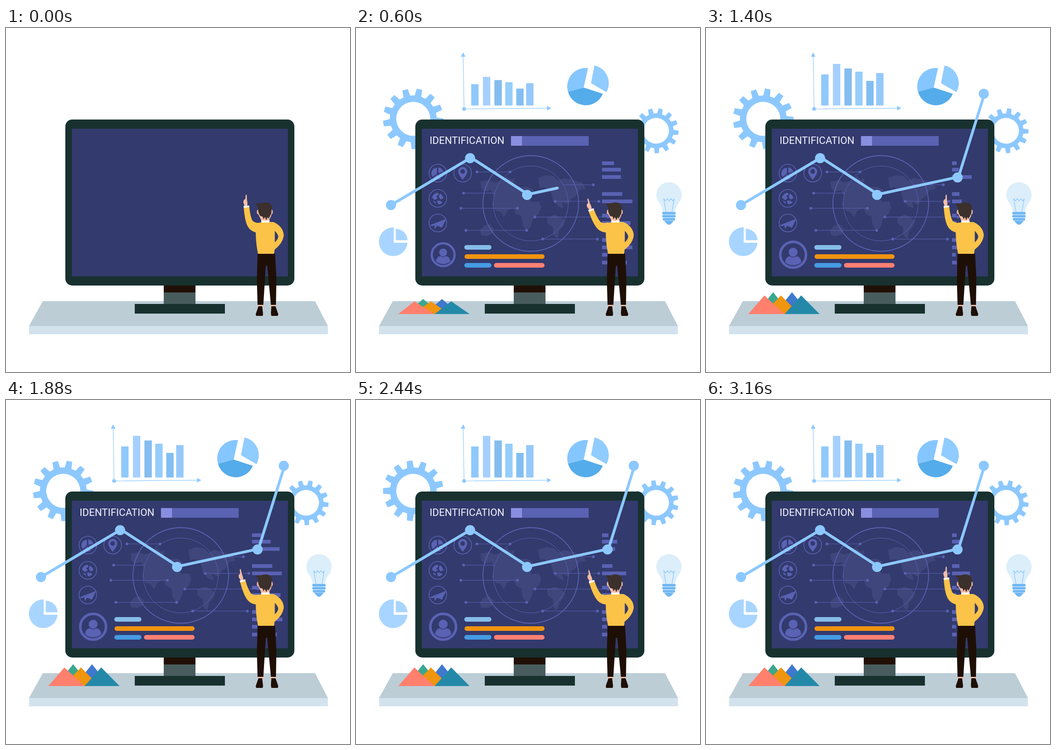
Recreate the animation shown at these times as an HTML page. Size 748x748 px, loop 3200 ms.

```html
<!DOCTYPE html>
<html lang="en">
<head>
<meta charset="utf-8">
<title>Identification dashboard</title>
<style>
html, body { margin: 0; width: 100%; height: 100%; overflow: hidden; background: #fff; }
svg { display: block; width: 100vw; height: 100vh; }
text { font: 22px Roboto, "Liberation Sans", sans-serif; fill: #f3f4ff; }
.ink { fill: #5a62b4; }
.wire { fill: none; stroke: #5a62b4; }
.sky { fill: #8cc8ff; }
.skin { fill: #f4bda6; }
.dark { fill: #18312f; }
.black { fill: #1e0f06; }
.shirt { fill: #fbc348; }
</style>
</head>
<body>
<svg viewBox="0 0 748 748">
  <g id="gears" class="sky" fill-rule="evenodd"></g>

  <g id="axes" class="sky">
    <path d="M233 60L235 176L418 174.300" fill="none" stroke="#8cc8ff" stroke-width="1.200"/>
    <path d="M233 53L238 62.500H228ZM424.500 174.300L415.500 169.500V179.500Z"/>
    <circle cx="235" cy="176" r="4"/>
  </g>
  <g id="columns"></g>

  <g class="pop" data-x="505" data-y="125">
    <path d="M495 129.500L504.500 87.300A40 40 0 0 0 461 138.500Z" fill="#85c6ff"/>
    <path d="M495 129.500L461 138.500A40 40 0 0 0 536.700 143Z" fill="#55acea"/>
    <path d="M511 120L518.500 81.500A39.300 39.300 0 0 1 544.500 139.500Z" fill="#90ccff"/>
  </g>
  <g class="pop" data-x="81" data-y="465" fill="#a8d5ff">
    <path d="M82 433.500V467H112A31.200 31.200 0 1 1 82 433.500Z"/>
    <path d="M86.500 436.500A25.500 25.500 0 0 1 112 461.500H86.500Z"/>
  </g>
  <g class="pop" data-x="680.5" data-y="380" fill="#70b7f4">
    <path d="M667 400Q666 389 659 380A27.500 27.500 0 1 1 702 380Q695 389 694 400Z" fill="#dbeefa"/>
    <path d="M674 400L669 371L673 376L677 371L681 376L685 371L689 376L692 371L687 400" fill="none" stroke="#8cc8ff" stroke-width="1.300"/>
    <rect x="666" y="400" width="29" height="5.500" rx="2"/>
    <rect x="666" y="406.500" width="29" height="5.500" rx="2"/>
    <rect x="667" y="413" width="27" height="5.500" rx="2"/>
    <path d="M670 419H691L686 425Q680.500 431 675 425Z"/>
  </g>

  <path d="M80 594H672L700 648H50Z" fill="#bccdd6"/>
  <rect x="50" y="648" width="650" height="18" fill="#d3e3ee"/>
  <rect class="dark" x="129" y="199" width="498" height="361" rx="15"/>
  <rect x="143" y="219" width="470" height="321" fill="#333a6d"/>
  <rect x="343" y="560" width="69" height="15" fill="#200f04"/>
  <rect x="343" y="575" width="69" height="26" fill="#485c5e"/>
  <rect class="dark" x="280" y="600" width="196" height="21"/>

  <g id="screen">
    <text x="160" y="252">IDENTIFICATION</text>
    <rect class="ink" x="337" y="235" width="169" height="21"/>
    <rect x="337" y="235" width="24" height="21" fill="#8a8ee0"/>

    <g fill="#3f467b">
      <path d="M271 334L290 331L300 336L318 332L328 322L336 330L345 326L342 340L356 346L372 345L385 352L384 364L376 368L382 378L398 377L403 390L396 406L386 412L380 432L371 442L362 428L360 410L348 404L343 392L330 396L322 412L314 400L304 398L296 384L300 366L294 352L280 356L272 348Z"/>
      <path d="M396 326L412 320L430 322L440 332L452 326L470 330L492 337L500 350L486 352L478 366L468 372L462 384L448 378L452 392L440 388L428 374L424 356L410 346L400 348Z"/>
      <path d="M416 412L432 406L446 412L455 420L450 432L442 440L438 458L430 452L428 434L416 424Z"/>
      <path d="M270 440L278 430L290 427L300 436L296 448L284 452L272 451Z"/>
    </g>
    <circle class="wire" cx="380" cy="381.500" r="104" stroke-width="1.800"/>
    <circle class="wire" cx="380" cy="381.500" r="81.500"/>
    <g id="leads" class="ink"></g>

    <g class="wire" stroke-width="1.600">
      <circle cx="178" cy="315.500" r="19.200"/>
      <circle cx="232" cy="315.500" r="19.200"/>
      <circle cx="178" cy="370.500" r="19.200"/>
      <circle cx="178" cy="424" r="19.200"/>
    </g>
    <g class="ink">
      <path d="M176 316V304A12 12 0 0 0 167 324ZM177 318L168 326A13 13 0 0 0 185 327ZM179 315V303A13 13 0 0 1 190 313ZM180 317L190 316Q190 322 187 325Z"/>
      <path fill-rule="evenodd" d="M232 330Q222 318 222 312A10 10 0 0 1 242 312Q242 318 232 330ZM232 307A5 5 0 1 0 232 317A5 5 0 1 0 232 307Z"/>
      <path d="M166 366Q170 359 177 358L180 362L174 366L178 370L172 374L166 370ZM182 360Q189 363 190 370L184 373L180 367ZM176 375L184 376L188 379Q184 384 178 383ZM167 375L173 378L174 382Q169 380 167 375Z"/>
      <path d="M160 429L196 415L187 434L176 430L172 437L170 429L190 418L166 431Z"/>
    </g>
    <g id="avatar">
      <circle class="wire" cx="189.500" cy="493" r="28" stroke-width="5.500"/>
      <path class="ink" d="M172 509Q173 497 184 496H195Q206 497 207 509Q200 516 189.500 516Q179 516 172 509Z"/>
      <circle cx="189.500" cy="487.500" r="10.500" class="ink" stroke="#333a6d" stroke-width="1.500"/>
    </g>
    <rect x="235.500" y="472" width="59" height="10" rx="5" fill="#85bde9"/>
    <rect x="236" y="492" width="174" height="10" rx="5" fill="#f0940f"/>
    <rect x="235.500" y="511" width="59" height="10" rx="5" fill="#459be3"/>
    <rect x="300" y="511" width="110" height="10" rx="5" fill="#ff7f73"/>
    <g id="rows" class="ink"></g>
  </g>

  <g id="peaks">
    <path d="M146 574.500L108 622H184Z" fill="#3aa78f"/>
    <path d="M187 574.500L149 622H225Z" fill="#3f78cf"/>
    <path d="M163 581.500L123 622H203Z" fill="#ef950f"/>
    <path d="M127 581.500L92 622H170.500Z" fill="#ff806d"/>
    <path d="M207 581.500L171 622H247Z" fill="#2489a9"/>
  </g>

  <polyline id="trend" transform="translate(2 -1.200)" fill="none" stroke="#8cc8ff" stroke-width="6" stroke-linecap="round" stroke-linejoin="round"/>
  <g id="dots" class="sky"></g>

  <g id="man">
    <path class="skin" d="M548 601H559V608H548ZM576 601H586V608H576Z"/>
    <path class="black" d="M549 605H557L559 622L558 626H544L543 622ZM577 605H586L592 622L591 626H577L576 620Z"/>
    <path class="black" d="M547 490H585L588 545L587 602H576L568 517H565L559.500 602H547L545.500 550Z"/>
    <path class="shirt" fill-rule="evenodd" d="M541 425Q562 420 582 422Q603 432 604 451Q602 468 584 482L583 491H548Q543 468 543 440ZM584.500 441V466Q592 459 592 453Q591 448 584.500 441Z"/>
    <path class="skin" d="M549 394H577V408L571 420H556L549 406Z"/>
    <ellipse class="skin" cx="548" cy="400" rx="2.500" ry="5"/>
    <ellipse class="skin" cx="577.500" cy="400" rx="2.500" ry="5"/>
    <path d="M543 381Q551 383 558 380Q574 377 578 388L577 403L571 415L569 411L566 418L563 411L560 416L558 410L553 409Q547 401 548 390Z" fill="#3b302c"/>
    <path d="M555 418Q564 420 573 417.500V423H555Z" fill="#fff"/>
    <g id="arm">
      <path class="skin" d="M519 388L516 379Q516 373 520.500 372L521 364Q522.500 360 523.500 364L524 374Q526 381 524.500 388Z"/>
      <path class="shirt" d="M517 390L529 389Q531 410 536 419Q541 424 551 424V446Q533 444 526 432Q519 420 517 390Z"/>
      <path d="M516.500 387L529 386V389.500L517 391Z" fill="#fff"/>
    </g>
  </g>
</svg>
<script>
const LOOP = 3200, STEP = 40, BEAT = 1520;
const $ = id => document.getElementById(id);
const clamp = v => Math.max(0, Math.min(1, v));
const set = (el, attrs) => { for (const k in attrs) el.setAttribute(k, attrs[k]); };
function add(parent, tag, attrs) {
  const el = document.createElementNS("http://www.w3.org/2000/svg", tag);
  set(el, attrs);
  return parent.appendChild(el);
}
// Linear interpolation through [time, value] pairs
function track(t, keys) {
  const i = keys.findIndex(k => k[0] > t);
  if (i < 0) return keys[keys.length - 1][1];
  if (!i) return keys[0][1];
  const [a, u] = keys[i - 1], [b, v] = keys[i];
  return u + (v - u) * (t - a) / (b - a);
}

function gearPath(outer, body, hole, teeth) {
  const points = [];
  for (let i = 0; i < teeth; i++)
    for (const [r, off] of [[body, -.3], [outer, -.19], [outer, .19], [body, .3]]) {
      const a = (i + off) / teeth * 2 * Math.PI;
      points.push((r * Math.sin(a)).toFixed(2) + " " + (-r * Math.cos(a)).toFixed(2));
    }
  return `M${points.join("L")}ZM${-hole} 0a${hole} ${hole} 0 1 0 ${2 * hole} 0a${hole} ${hole} 0 1 0 ${-2 * hole} 0Z`;
}
const gears = [[124.5, 197.5, 66, 51, 37], [652.5, 223.5, 49, 38, 28]].map(([x, y, ...radii]) =>
  ({ x, y, el: add($("gears"), "path", { d: gearPath(...radii, 13) }) }));

const columns = [[250.5, 101, "#8fc8fb"], [276, 78, "#a5cfff"], [301, 88, "#84bdf0"],
  [324.5, 95, "#95cdfd"], [348.5, 115, "#82bef2"], [370, 98, "#95c9fa"]].map(([x, top, fill]) =>
  ({ height: 168.5 - top, el: add($("columns"), "rect", { x, width: 16, fill }) }));

for (const [x1, x2, y, open] of [[263, 335, 313], [234, 301, 359, 1], [228, 351, 392], [239, 371, 440],
  [389, 548, 411], [433, 528, 377], [406, 525, 459], [450, 516, 341, 2]]) {
  add($("leads"), "path", { d: `M${x1} ${y}H${x2}`, stroke: "#5a62b4" });
  if (open !== 2) add($("leads"), "circle", { cx: x1, cy: y, r: 3 });
  if (open !== 1) add($("leads"), "circle", { cx: x2, cy: y, r: 3 });
}

const waves = {
  quick: [[120, 0], [320, 1], [740, 1], [975, 0]],
  broad: [[100, .03], [320, .87], [370, 1], [830, 1], [920, .7], [1150, 0], [1520, .03]],
  early: [[0, .13], [120, .4], [320, .87], [370, 1], [830, 1], [920, .7], [1250, 0], [1400, 0], [1520, .13]],
  double: [[0, .25], [120, .1], [310, 1], [360, .9], [860, .26], [920, .38], [1400, .62], [1520, .25]]
};
const rows = [[294, 10, 26, "quick"], [308, 14, 41, "broad"], [324, 5, 66, "double"], [361, 16, 44, "quick"],
  [377, 21, 66, "early"], [408, 10, 40, "quick"], [424, 10, 62, "quick"], [461, 10, 12, "quick"],
  [477, 11, 66, "quick"], [493, 8, 12, "broad"], [510, 10, 54, "quick"]].map(([y, min, max, wave]) =>
  ({ min, max, wave, el: add($("rows"), "rect", { x: 535, y: y - 4, height: 8 }) }));

const trend = [[76, 385], [248, 283], [372, 363], [547, 325], [604, 143]];
const dots = trend.map(([cx, cy]) => add($("dots"), "circle", { cx, cy }));

function drawTrend(t) {
  let left = t * .688;
  const points = [trend[0]];
  for (let i = 1; i < trend.length && left > 0; i++) {
    const [a, b] = trend[i - 1], [c, d] = trend[i];
    const length = Math.hypot(c - a, d - b), p = Math.min(1, left / length);
    points.push([a + (c - a) * p, b + (d - b) * p]);
    left -= length;
  }
  set($("trend"), { points: points.join(" "), visibility: t ? "visible" : "hidden" });
  dots.forEach((dot, i) => set(dot, { r: 11 * clamp((t - 50 - 200 * i) / 140) }));
}

const scaleAt = (x, y, sx, sy = sx) => `translate(${x} ${y}) scale(${sx} ${sy}) translate(${-x} ${-y})`;

function draw(t) {
  const fade = clamp(t / 400), grow = clamp((t - 40) / 815), pop = clamp(t / 430);
  set($("screen"), { opacity: fade });
  set($("axes"), { opacity: fade });
  set($("gears"), { opacity: clamp(t / 320) });
  for (const { x, y, el } of gears) set(el, { transform: `translate(${x} ${y}) rotate(${t * .065 + .5})` });
  for (const { height, el } of columns) set(el, { y: 168.5 - height * grow, height: height * grow });
  for (const el of document.querySelectorAll(".pop"))
    set(el, { transform: scaleAt(+el.dataset.x, +el.dataset.y, pop) });
  set($("peaks"), { transform: scaleAt(0, 622, 1, grow) });
  set($("avatar"), { transform: scaleAt(189.5, 493, .7 + .3 * clamp(t / 960)) });
  for (const { min, max, wave, el } of rows)
    set(el, { width: min + (max - min) * track(t % BEAT, waves[wave]) });
  const tilt = track(t % 1600, [[0, 0], [280, 10.5], [320, 12.3], [600, 15], [840, 13.3], [880, 12], [1250, 0]]);
  set($("arm"), { transform: `rotate(${-tilt} 545 436)` });
  drawTrend(t);
}

const start = performance.now();
function tick() {
  const t = (performance.now() - start) % LOOP;
  draw(Math.floor(t / STEP) * STEP);
  requestAnimationFrame(tick);
}
tick();
</script>
</body>
</html>
```
